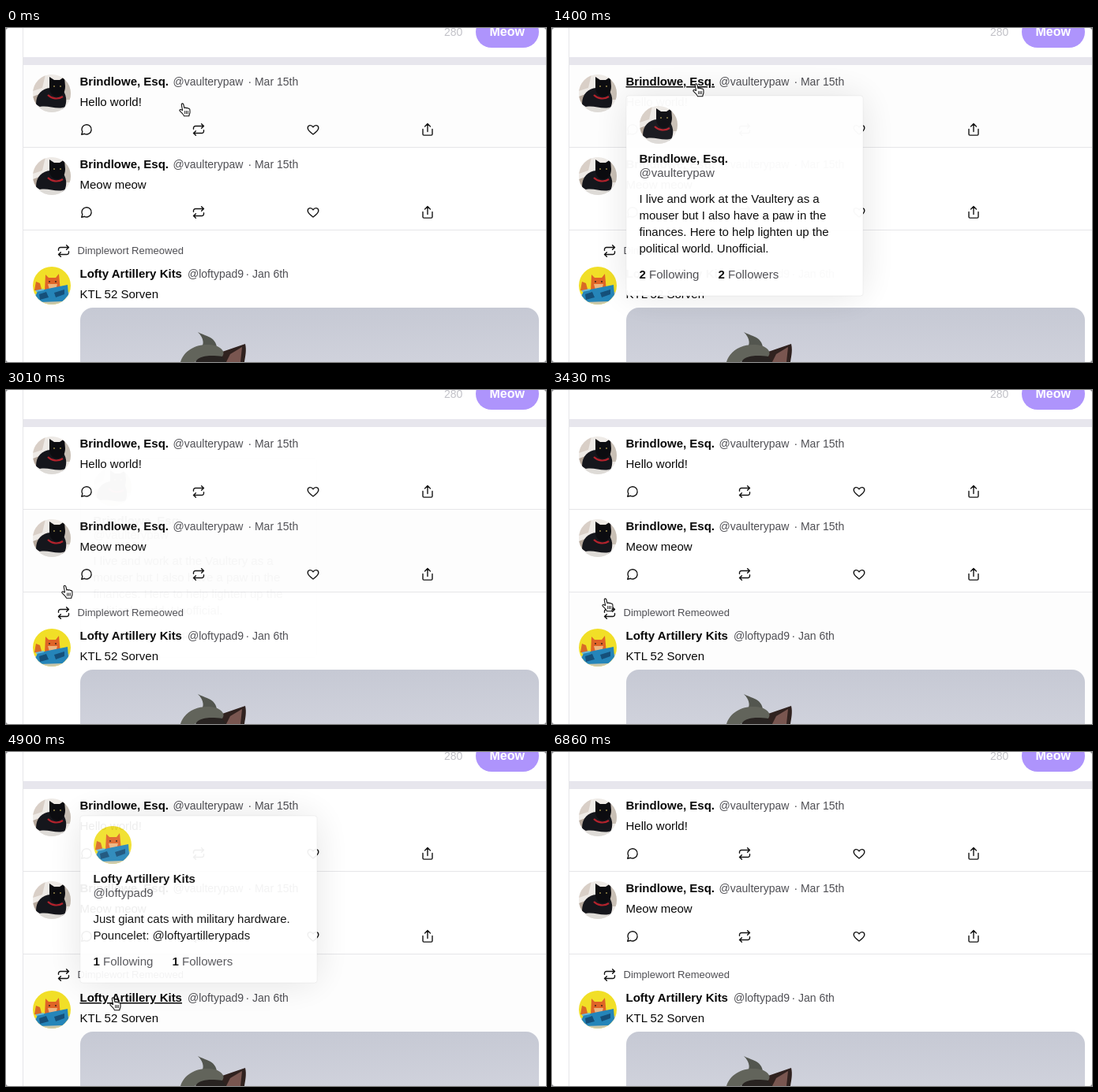
These frames come from a looping animation (684x424 px, 6930 ms). An HTML page:

```html
<!DOCTYPE html>
<html lang="en">
<head>
<meta charset="utf-8">
<title>Profile hover cards</title>
<style>
  html, body { margin: 0; width: 100%; height: 100%; overflow: hidden; background: #fff; }
  svg { display: block; width: 684px; height: 424px; }
  text { font: 15px "Liberation Sans", Arial, sans-serif; fill: #080808; white-space: pre; }
  .bold { font-weight: 700; }
  .meta { font-size: 14px; fill: #4f4f54; }
  .small { font-size: 13px; fill: #4f4f54; }
  .grey { fill: #4f4f54; }
  .icon { fill: none; stroke: #141414; stroke-width: 1.4; stroke-linecap: round; stroke-linejoin: round; }
  .hovered { text-decoration: underline; }
</style>
</head>
<body>
<svg viewBox="0 0 684 424">
  <defs>
    <clipPath id="round"><circle r="24"/></clipPath>
    <filter id="blur" x="-40%" y="-60%" width="180%" height="220%"><feGaussianBlur stdDeviation="25"/></filter>
    <linearGradient id="sky" x2="0" y2="1">
      <stop stop-color="#c6c9d4"/><stop offset=".6" stop-color="#d0d2dc"/><stop offset="1" stop-color="#d6d8e0"/>
    </linearGradient>

    <g id="blackCat" clip-path="url(#round)">
      <rect x="-24" y="-24" width="48" height="48" fill="#eeeae6"/>
      <path d="M-24-24H-8L-12-7-24-3Z" fill="#d9cfc7"/>
      <path d="M13-24H24V8H15Z" fill="#c8bfb5"/>
      <path d="M-24 4-13 0-10 14-24 15Z" fill="#b6a89c"/>
      <path d="M-20 14C-20 0-12-6-2-7L14-4C20 4 19 14 15 20L-12 19Z" fill="#15161c"/>
      <path d="M-3-6-3-21 3-17H10L16-21 17-9C17-1 13 4 7 4S-2 0-3-6Z" fill="#0c0c10"/>
      <path d="M-5 2C0 7 8 8 14 4" fill="none" stroke="#b3222c" stroke-width="2.2"/>
      <circle cx="3" cy="-9" r="1.1" fill="#8c7d45"/><circle cx="11" cy="-9" r="1.1" fill="#8c7d45"/>
      <path d="M-18 18C-7 13 6 22 17 17V24H-18Z" fill="#dedbd7"/>
    </g>

    <g id="gingerCat" clip-path="url(#round)">
      <rect x="-24" y="-24" width="48" height="48" fill="#f1df27"/>
      <path d="M-24 11 24 8V24H-24Z" fill="#c9c6aa"/>
      <path d="M-22 6-20-5-15-3-12 8Z" fill="#d96a25"/>
      <path d="M-9 7-8-14-4-10H5L9-15 11 7Z" fill="#df6427"/>
      <path d="M-5-2H7L5 5H-3Z" fill="#edb47e"/>
      <circle cx="-3" cy="-5" r="1" fill="#3b2417"/><circle cx="5" cy="-5" r="1" fill="#3b2417"/>
      <path d="M-18 7-5 4 20-1 21 12 14 20-16 21-21 14Z" fill="#2585b9"/>
      <path d="M-16 11-7 8-4 15-15 18ZM3 9 16 5V11L5 15Z" fill="#15507a"/>
      <path d="M-20 7-10 5" stroke="#6db9d8" stroke-width="2"/>
    </g>

    <path id="reply" class="icon" d="M-6.3 6.2-5.2 2.9A6.1 6.1 0 1 1-2.6 5.3Z"/>
    <path id="repeat" class="icon" d="M-6.5-.8V-2A2.5 2.5 0 0 1-4-4.5H6.2M3.6-7.3 6.5-4.5 3.6-1.7M6.5.8V2A2.5 2.5 0 0 1 4 4.5H-6.2M-3.6 7.3-6.5 4.5-3.6 1.7"/>
    <path id="heart" class="icon" d="M0 6C-4 3-6.8.8-6.8-2-6.8-5.9-2-6.6 0-3.2 2-6.6 6.8-5.9 6.8-2 6.8.8 4 3 0 6Z"/>
    <path id="share" class="icon" d="M0 2.6V-7M-3.4-4 0-7.4 3.4-4M-6-.6V5.7A1.4 1.4 0 0 0-4.6 7.1H4.6A1.4 1.4 0 0 0 6 5.7V-.6"/>
  </defs>

  <rect width="684" height="424" fill="#858589"/>
  <rect width="684" height="424" rx="3.5" fill="#fff"/>
  <g id="rows"></g>
  <rect x="21" width="1" height="424" fill="#e6e6e9"/>
  <rect x="22" y="37" width="662" height="10" fill="#e7e6ed"/>
  <path d="M22 151.5H684M22 256.5H684" stroke="#e6e6e9"/>
  <text x="555" y="10" class="meta" style="fill:#c2c2c8">280</text>
  <rect x="595" y="-15" width="80" height="40" rx="20" fill="#ae94fc"/>
  <text x="612.5" y="10" class="bold" style="font-size:16px;fill:#fff">Meow</text>

  <g id="feed"></g>

  <clipPath id="frame"><rect x="94" y="355" width="581" height="120" rx="16"/></clipPath>
  <g clip-path="url(#frame)">
    <rect x="94" y="355" width="581" height="120" fill="url(#sky)"/>
    <path d="M243 386C251 391 265 391 267 405L248 405C252 398 248 391 243 386Z" fill="#53564f"/>
    <path d="M264 424 271 412 303 401C305 409 303 417 302 424Z" fill="#30221f"/>
    <path d="M279 424 284 414 299 405 297 424Z" fill="#795650"/>
    <path d="M221 424C226 408 242 401 258 402 271 403 279 410 274 417L245 420 239 424Z" fill="#62645b"/>
    <path d="M240 424C244 416 257 415 274 417L279 424Z" fill="#282321"/>
  </g>

  <g id="cards"></g>
  <g id="cursor" stroke="#111" stroke-linejoin="round" stroke-linecap="round">
    <path fill="#fff" stroke-width="1.1" d="M4.6 9.5 3.3 2.6C3 .6 5.3.2 5.8 2L7 6.6C8 5.8 9 6 9.4 6.8 10.3 6 11.4 6.4 11.7 7.3 12.8 6.8 13.8 7.6 13.9 8.8L14 12C14 13.6 13 14.4 12.8 16.8H6.6C5.8 14.4 3.2 12.4 1.2 10.4.2 9 1.8 8 3 8.8Z"/>
    <path stroke-width=".9" d="M7.6 10.5V13.8M9.5 10.5V13.8M11.4 10.5V13.8"/>
  </g>
</svg>

<script>
const LOOP = 6930;
const $ = id => document.getElementById(id);
const text = (x, y, cls, str, id = '') => `<text x="${x}" y="${y}" class="${cls}" id="${id}">${str}</text>`;
const use = (id, x, y) => `<use href="#${id}" x="${x}" y="${y}"/>`;
const avatar = (id, x, y) => `<g transform="translate(${x} ${y})"><use href="#${id}"/></g>`;

const brindlowe = {
  name: 'Brindlowe, Esq.', handle: '@vaulterypaw', picture: 'blackCat', count: 2, top: 86,
  bio: ['I live and work at the Vaultery as a', 'mouser but I also have a paw in the',
        'finances. Here to help lighten up the', 'political world. Unofficial.'],
  hover: [330, 2500], fadeIn: [850, 1550], fadeOut: [2600, 3110]
};
const lofty = {
  name: 'Lofty Artillery Kits', handle: '@loftypad9', picture: 'gingerCat', count: 1, top: 81,
  bio: ['Just giant cats with military hardware.', 'Pouncelet: @loftyartillerypads'],
  hover: [3900, 6080], fadeIn: [4420, 5120], fadeOut: [6180, 6690]
};
const people = [brindlowe, lofty];

function post(who, y, handleX, dateX, date, body, id) {
  return avatar(who.picture, 58, y + 15) +
    text(93.5, y + 5, 'bold', who.name, id) +
    text(handleX, y + 5, 'meta', who.handle) +
    text(dateX, y + 5, 'meta', '· ' + date) +
    text(93.5, y + 31, '', body);
}
const actions = y => ['reply', 'repeat', 'heart', 'share']
  .map((icon, i) => use(icon, [102, 244, 389, 534][i], y)).join('');

function card(who, i) {
  const { top, bio, count } = who;
  const height = 170 + 21 * bio.length, last = top + height - 22;
  const box = `x="94" y="${top}" width="300" height="${height}" rx="3"`;
  return `<g id="card${i}">
    <rect ${box} filter="url(#blur)" opacity=".11"/>
    <rect ${box} fill="#fff" stroke="#000" stroke-opacity=".05"/>` +
    avatar(who.picture, 135, top + 37) +
    text(110.5, top + 85, 'bold', who.name) +
    text(110.5, top + 103, 'grey', who.handle) +
    bio.map((line, n) => text(110.5, top + 136 + 21 * n, '', line)).join('') +
    ['Following', 'Followers'].map((label, n) =>
      text(110.5 + 100 * n, last, 'grey', `<tspan class="bold" fill="#080808">${count}</tspan> ${label}`)).join('') +
    '</g>';
}

const rowEdges = [47, 151, 256, 424];
$('rows').innerHTML = [0, 1, 2].map(i =>
  `<rect id="row${i}" x="22" y="${rowEdges[i]}" width="662" height="${rowEdges[i + 1] - rowEdges[i]}" fill="#fdfdfd"/>`).join('');
$('feed').innerHTML =
  post(brindlowe, 68, 211.5, 306.4, 'Mar 15th', 'Hello world!', 'name0') + actions(129) +
  post(brindlowe, 173, 211.5, 306.4, 'Mar 15th', 'Meow meow', '') + actions(234) +
  use('repeat', 73, 283) + text(90.5, 286.5, 'small', 'Dimplewort Remeowed') +
  post(lofty, 312, 230, 303.4, 'Jan 6th', 'KTL 52 Sorven', 'name1');
$('cards').innerHTML = people.map(card).join('');

// Pointer stops: time, x, y
const path = [
  [0, 219, 95], [50, 219, 95], [420, 179, 73], [530, 179, 73], [630, 178, 70], [2450, 178, 70],
  [2800, 92, 205], [3080, 66, 255], [3430, 63, 264], [3620, 63, 264], [3990, 127, 309],
  [4120, 127, 309], [4340, 131, 311], [6000, 131, 311], [6160, 173, 334], [6520, 235, 430], [LOOP, 235, 430]
];

const clamp = v => Math.min(1, Math.max(0, v));
const smooth = v => v * v * (3 - 2 * v);
const progress = (t, [from, to]) => clamp((t - from) / (to - from));

// CSS "ease": cubic-bezier(.25, .1, .25, 1)
function ease(x) {
  const curve = (s, a, b) => 3 * (1 - s) ** 2 * s * a + 3 * (1 - s) * s * s * b + s ** 3;
  let low = 0, high = 1;
  for (let i = 0; i < 20; i++) {
    const mid = (low + high) / 2;
    curve(mid, .25, .25) < x ? low = mid : high = mid;
  }
  return curve(low, .1, 1);
}

function pointer(t) {
  const next = path.findIndex(stop => stop[0] > t);
  const [t0, x0, y0] = path[next - 1], [t1, x1, y1] = path[next];
  const k = smooth((t - t0) / (t1 - t0));
  return [x0 + (x1 - x0) * k, y0 + (y1 - y0) * k];
}

function draw(now) {
  const t = now % LOOP;
  const [x, y] = pointer(t);
  $('cursor').setAttribute('transform', `translate(${x} ${y})`);
  for (let i = 0; i < 3; i++)
    $('row' + i).style.opacity = +(y >= rowEdges[i] && y < rowEdges[i + 1]);
  people.forEach((who, i) => {
    const shown = t < who.fadeOut[0] ? ease(progress(t, who.fadeIn)) : 1 - ease(progress(t, who.fadeOut));
    $('card' + i).style.opacity = shown < .002 ? 0 : shown;
    $('name' + i).classList.toggle('hovered', t >= who.hover[0] && t < who.hover[1]);
  });
}

const start = performance.now();
function tick() {
  draw(performance.now() - start);
  requestAnimationFrame(tick);
}
tick();
</script>
</body>
</html>
```
